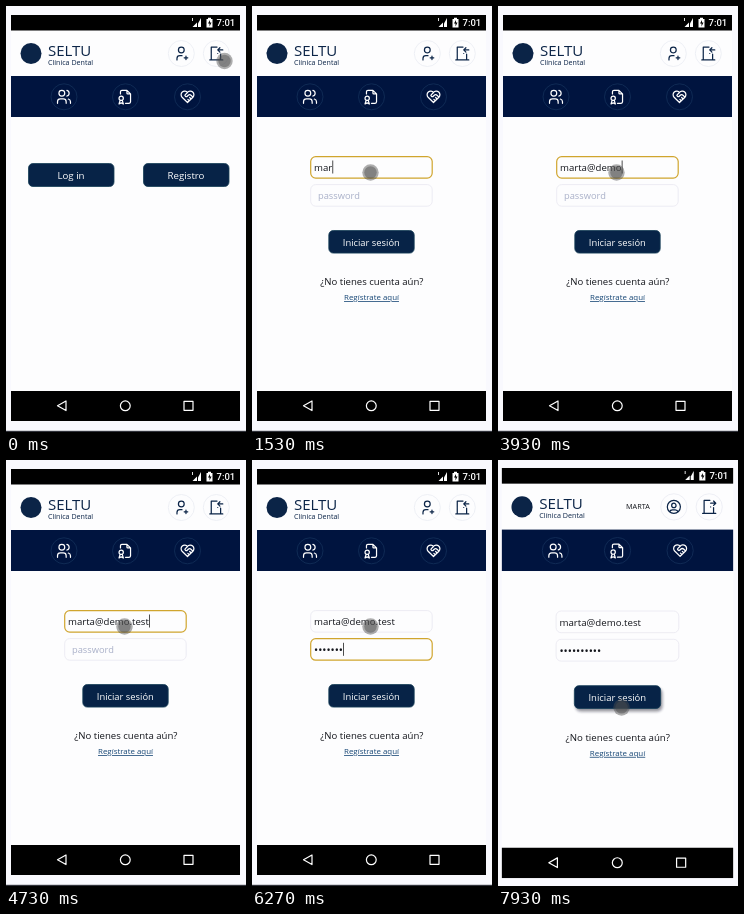
Write an HTML page that moves like this. It is 240 px wide and 426 px high and loops after 8 s.

```html
<!DOCTYPE html>
<html lang="es">
<head>
<meta charset="utf-8">
<title>Inicio de sesión</title>
<style>
  html, body { margin: 0; width: 100%; height: 100%; overflow: hidden; background: #f9f9fe; }
  svg { display: block; width: 100%; height: 100%; }
  text { font-family: "Open Sans", "Noto Sans", sans-serif; fill: #14161c; }
  .mid { text-anchor: middle; }
  .light { fill: #fff; font-weight: 500; }
  .brand { fill: #0b2447; font-weight: 500; }
  .hint { font-size: 9.3px; fill: #a9b0c8; }
  .typed { font-size: 9.6px; }
  .icon { fill: none; stroke: #0b2447; stroke-width: 1.7; stroke-linecap: round; stroke-linejoin: round; }
  .bar .icon { stroke: #fff; }
  .ring { fill: none; stroke: #eaecf3; stroke-width: .8; }
  .bar .ring { stroke: #14305a; }
  .button { fill: #072347; stroke: #173f57; stroke-width: .8; }
  .field { fill: #fdfdfe; stroke: #e9e8f0; stroke-width: .8; }
  .field.focus { stroke: #d0a52e; stroke-width: 1.2; }
  .keys { fill: none; stroke: #fff; stroke-width: 1.2; stroke-linejoin: round; }
</style>
</head>
<body>
<svg viewBox="0 0 240 426" preserveAspectRatio="none">
  <defs>
    <filter id="blur" x="-20%" y="-50%" width="140%" height="200%"><feGaussianBlur stdDeviation="1.5"/></filter>
    <path id="users" d="M5 7a4 4 0 1 0 8 0a4 4 0 1 0-8 0M3 21v-2a4 4 0 0 1 4-4h4a4 4 0 0 1 4 4v2M16 3.1a4 4 0 0 1 0 7.8M21 21v-2a4 4 0 0 0-3-3.9"/>
    <path id="certificate" d="M14 3v4a1 1 0 0 0 1 1h4M5 8V5a2 2 0 0 1 2-2h7l5 5v11a2 2 0 0 1-2 2h-5M3 14a3 3 0 1 0 6 0a3 3 0 1 0-6 0M4.5 17L3 22l3-1.5L9 22l-1.5-5"/>
    <path id="heart" d="M19.5 12.6L12 20l-7.5-7.4a5 5 0 1 1 7.5-6.6a5 5 0 1 1 7.5 6.6M12 6L8.7 9.3a1 1 0 0 0 0 1.4l.5.5c.7.7 1.8.7 2.5 0l1-1a3.2 3.2 0 0 1 4.5 0l2.3 2.3M12.5 15.5l2 2M15 13l2 2"/>
    <path id="addUser" d="M8 7a4 4 0 1 0 8 0a4 4 0 0 0-8 0M16 18h5M18.5 15.5v5M6 21v-2a4 4 0 0 1 4-4h3"/>
    <path id="account" d="M3 12a9 9 0 1 0 18 0a9 9 0 1 0-18 0M9 10a3 3 0 1 0 6 0a3 3 0 1 0-6 0M6.2 18.8A4 4 0 0 1 10 16h4a4 4 0 0 1 3.8 2.9"/>
    <path id="door" d="M14 12v.01M3 21h18M5 21V3h8M18 13v8"/>
    <path id="arrowIn" d="M21 7h-7m3-3l-3 3l3 3"/>
    <path id="arrowOut" d="M14 7h7m-3-3l3 3l-3 3"/>
  </defs>

  <rect width="240" height="426" fill="#f9f9fe"/>
  <g id="phone">
    <rect y="424.8" width="240" height="1.4" fill="#30323a"/>
    <rect x="5" y="9" width="229" height="406" fill="#fdfdfe"/>
    <rect x="5" y="9" width="229" height="15.5"/>
    <path d="M195 12v9h-3v-3.500z" fill="#fff"/>
    <path d="M191 16.500v4.500h-4.500z" fill="#fff"/>
    <path d="M186.500 12v3" stroke="#ddd"/>
    <path d="M200.500 13h1.500v-1.200h3v1.200h1.500v8.500h-6z" fill="#fff"/>
    <path d="M204 14l-2 3.500h1.500v3l2-4h-1.500z"/>
    <text x="210.500" y="20.300" class="light" style="font: 500 9.500px Roboto, sans-serif">7:01</text>

    <circle cx="25" cy="47.500" r="10.500" fill="#0b2447"/>
    <text class="brand" x="42" y="50" font-size="15">SELTU</text>
    <text class="brand" x="42" y="58.500" font-size="7.100">Clínica Dental</text>
    <g id="header"></g>
    <rect x="5" y="70" width="229" height="41" fill="#00143f"/>
    <g id="menu" class="bar"></g>

    <g id="welcome">
      <rect class="button" x="22.500" y="157.500" width="85.500" height="23" rx="4.500"/>
      <rect class="button" x="137.500" y="157.500" width="85.500" height="23" rx="4.500"/>
      <text class="mid light" x="65" y="172.500" font-size="9.700">Log in</text>
      <text class="mid light" x="180" y="172.500" font-size="9.700">Registro</text>
    </g>

    <g id="login">
      <rect id="emailBox" class="field" x="58.700" y="150.600" width="121.500" height="21.500" rx="5"/>
      <rect id="passBox" class="field" x="58.700" y="178.600" width="121.500" height="21.600" rx="5"/>
      <text id="emailHint" class="hint" x="66" y="165">email</text>
      <text id="passHint" class="hint" x="66" y="193">password</text>
      <text id="email" class="typed" x="62" y="165.300"></text>
      <text id="pass" x="62" y="193.900" font-size="11"></text>
      <rect id="caret" width=".8" height="13" fill="#222"/>
      <rect id="shadow" x="78" y="227" width="86" height="23" rx="5" fill="#112" opacity=".45" filter="url(#blur)"/>
      <rect class="button" x="76.800" y="224.500" width="85.400" height="22.600" rx="4.500"/>
      <text class="mid light" x="119.300" y="239.800" font-size="9.400">Iniciar sesión</text>
      <text class="mid" x="119.800" y="279" font-size="9.600">¿No tienes cuenta aún?</text>
      <text class="mid" x="119.500" y="294" font-size="7.900" style="fill:#164675;text-decoration:underline">Regístrate aquí</text>
    </g>

    <rect x="5" y="385" width="229" height="30"/>
    <g class="keys">
      <path d="M60 395v9.600l-8.500-4.800z"/>
      <circle cx="119.300" cy="399.800" r="4.900"/>
      <rect x="178" y="395.300" width="9" height="9"/>
    </g>
    <g id="cursor" fill="#4c4c4c">
      <circle r="8.200" opacity=".45"/>
      <circle r="6.200" opacity=".45"/>
    </g>
  </g>
</svg>
<script>
const $ = id => document.getElementById(id);
const LOOP = 8000;
const OPEN_LOGIN = 350, FOCUS_EMAIL = 980, FOCUS_PASS = 4950, SUBMIT = 7550, SIGNED_IN = 7750;
const EMAIL = "marta@demo.test";
const emailKeys = [1100, 1270, 1430, 1650, 1850, 2450, 2750, 3000, 3250, 3500, 3980, 4130, 4300, 4450, 4600];
const passKeys = Array.from({ length: 10 }, (_, i) => 5080 + i * 190);

const badge = (x, y, ...names) =>
  `<circle class="ring" cx="${x}" cy="${y}" r="13"/>
   <g class="icon" transform="translate(${x} ${y}) scale(.72) translate(-12 -12)">
   ${names.map(n => `<use href="#${n}"/>`).join("")}</g>`;

$("menu").innerHTML = badge(58, 90.8, "users") + badge(119.5, 90.8, "certificate") + badge(181.5, 90.8, "heart");
$("header").innerHTML =
  `<g id="guest">${badge(175.3, 47.5, "addUser")}${badge(210.3, 47.5, "door", "arrowIn")}</g>
   <g id="member">${badge(175.3, 47.5, "account")}${badge(210.3, 47.5, "door", "arrowOut")}
   <text x="151.500" y="50" font-size="7.200" text-anchor="end">MARTA</text></g>`;

const show = (id, on) => $(id).setAttribute("visibility", on ? "visible" : "hidden");
const ease = (t, from, to) => {
  const p = Math.min(1, Math.max(0, (t - from) / (to - from)));
  return p * p * (3 - 2 * p);
};
const typedCount = (keys, t) => keys.filter(k => k <= t).length;

function drawCaret(t, focusTime, keys, text, y) {
  const lastKey = Math.max(focusTime, ...keys.filter(k => k <= t));
  const width = text.textContent ? text.getComputedTextLength() : 0;
  $("caret").setAttribute("x", 62.2 + width);
  $("caret").setAttribute("y", y);
  show("caret", (t - lastKey) % 1000 < 500);
}

function draw(t) {
  const onLogin = t >= OPEN_LOGIN;
  const onEmail = t >= FOCUS_EMAIL && t < FOCUS_PASS;
  const onPass = t >= FOCUS_PASS && t < SUBMIT;
  const emailLength = typedCount(emailKeys, t);
  const passLength = typedCount(passKeys, t);

  $("welcome").style.display = onLogin ? "none" : "";
  $("login").style.display = onLogin ? "" : "none";
  show("guest", t < SIGNED_IN);
  show("member", t >= SIGNED_IN);
  show("emailHint", !emailLength);
  show("passHint", !passLength);
  $("email").textContent = EMAIL.slice(0, emailLength);
  $("pass").textContent = "•".repeat(passLength);
  $("emailBox").classList.toggle("focus", onEmail);
  $("passBox").classList.toggle("focus", onPass);

  if (onEmail) drawCaret(t, FOCUS_EMAIL, emailKeys, $("email"), 154.5);
  else if (onPass) drawCaret(t, FOCUS_PASS, passKeys, $("pass"), 182.8);
  else show("caret", false);

  const toField = ease(t, 400, 900), toButton = ease(t, 7050, 7450);
  const x = 218.5 - 100 * toField + 5 * toButton;
  const y = 55 + 111.5 * toField + 79.5 * toButton;
  $("cursor").setAttribute("transform", `translate(${x} ${y})`);
  show("shadow", y > 224);

  const zoom = 1 + .01 * ease(t, 7400, 7900);
  $("phone").setAttribute("transform", `translate(119.5 110) scale(${zoom}) translate(-119.5 -110)`);
}

function tick() {
  draw(performance.now() % LOOP);
  requestAnimationFrame(tick);
}
tick();
</script>
</body>
</html>
```
